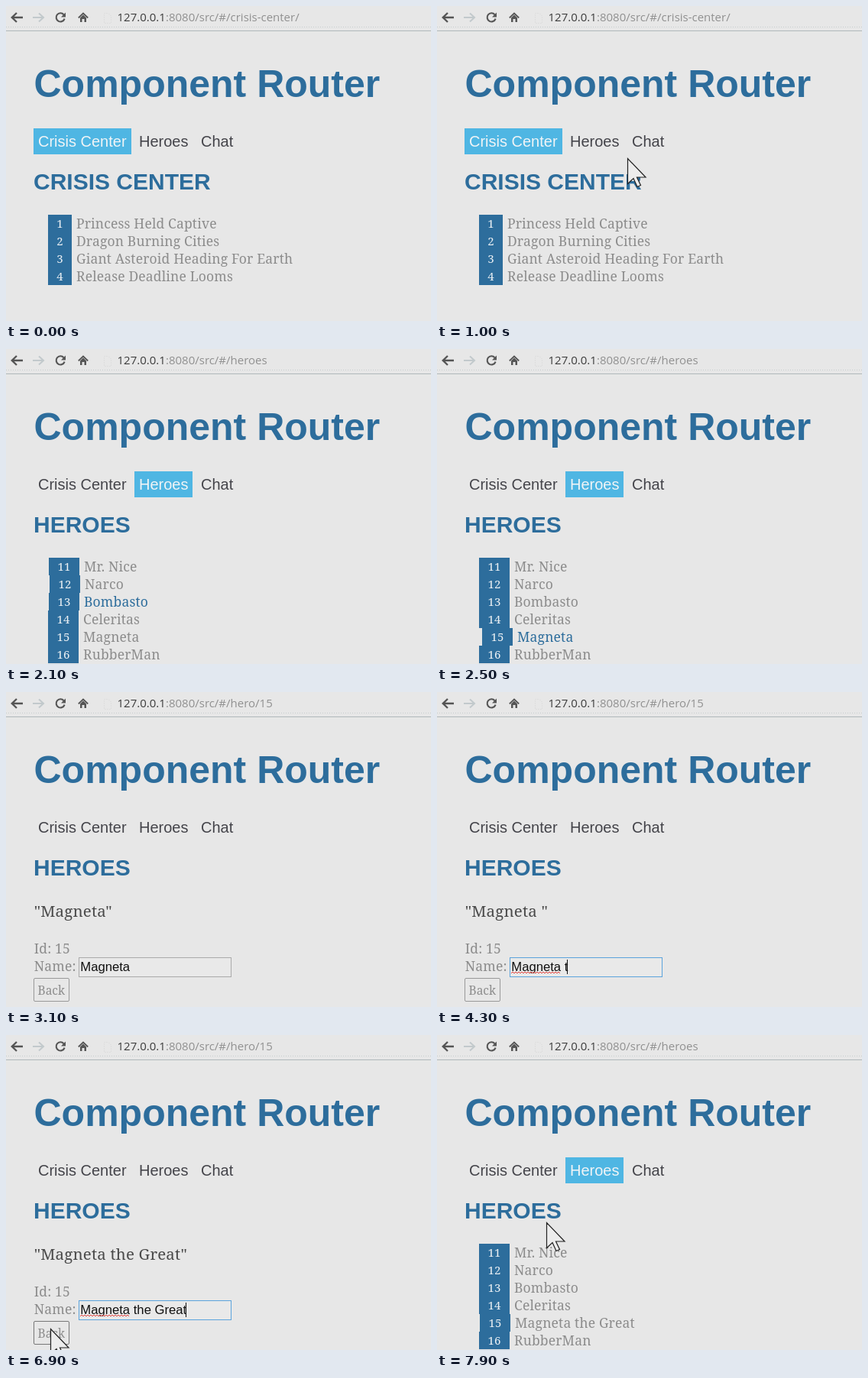
An HTML page that plays this animation: 556 px wide and 412 px high, repeating every 8000 ms.

```html
<!DOCTYPE html>
<html lang="en">
<head>
<meta charset="utf-8">
<title>Component Router</title>
<style>
  html, body { margin: 0; width: 100%; height: 100%; overflow: hidden; background: #e7e7e7; }
  svg { display: block; width: 556px; height: 412px; }
  text { white-space: pre; }
  .url { font: 15px "Open Sans", sans-serif; fill: #909090; }
  .host { fill: #3c3c3c; }
  .title, .head { font: bold 50px "Liberation Sans", Arial, sans-serif; fill: #2d6d9c; }
  .head { font-size: 30px; }
  .nav { font: 20px "Liberation Sans", Arial, sans-serif; fill: #44444a; }
  .nav.lit { fill: #f0f4f6; }
  .body { font: 17.5px "Noto Serif", serif; letter-spacing: .15px; fill: #8c8c8c; }
  .body.lit { fill: #2d6d9c; }
  .name { font-size: 20.5px; fill: #4a4a4a; }
  .num { font: 15px "Noto Serif", serif; fill: #eef2f5; text-anchor: middle; }
  .back { font-size: 15.5px; letter-spacing: 0; }
  .field { font: 16.67px "Liberation Sans", Arial, sans-serif; fill: #111; }
</style>
</head>
<body>
<svg viewBox="0 0 556 412" xmlns="http://www.w3.org/2000/svg">
  <rect width="556" height="412" fill="#e7e7e7"/>
  <path d="M0 27.5H556" stroke="#c6cccd" stroke-dasharray="1 2"/>
  <path d="M0 32.5H556" stroke="#b0b8ba"/>
  <g fill="none" stroke="#555" stroke-width="2.4">
    <path d="M14 9L7.8 15L14 21M8 15H22"/>
    <path d="M43 9.5L49 15L43 20.5M35 15H49" stroke="#c2c9cc" stroke-width="2"/>
    <path d="M75.5 11.2A5.6 5.6 0 1 0 76.6 16.6" stroke-width="2.1"/>
    <path d="M78 8.5V14.5H72Z" fill="#555" stroke="none"/>
    <path d="M94.8 15.5L101 9.6L107.2 15.5" stroke-width="1.8"/>
    <path d="M97 15.5L101 11.5L105 15.5V21H102.5V17H99.5V21H97Z" fill="#555" stroke="none"/>
    <path d="M128.5 9.5H134L137.5 13V22.5H128.5Z" stroke="#d4d4d4" stroke-width="1" stroke-dasharray="1 2"/>
  </g>
  <text class="title" x="36.5" y="119">Component Router</text>
  <g id="scene"></g>
</svg>
<script>
const LOOP = 8000, STEP = 100, BLUE = '#2d6d9c';
const NAME = 'Magneta the Great';
const crises = ['Princess Held Captive', 'Dragon Burning Cities',
  'Giant Asteroid Heading For Earth', 'Release Deadline Looms'];
const heroes = ['Mr. Nice', 'Narco', 'Bombasto', 'Celeritas', 'Magneta', 'RubberMan'];
const links = [
  { label: 'Crisis Center', x: 36, w: 128, textX: 42 },
  { label: 'Heroes', x: 168, w: 76, textX: 174 },
  { label: 'Chat', x: 249, w: 54, textX: 255 }
];

// Row index, pointer enters, pointer leaves
const hovers = [[0, 1850, 1950], [1, 1950, 2050], [2, 2050, 2150], [3, 2150, 2300],
  [4, 2300, 2700], [4, 7200, 7750]];

// Time, number of letters
const typed = [[0, 7], [4000, 8], [4300, 9], [4400, 10], [4500, 11], [4800, 12],
  [5000, 13], [5200, 14], [5400, 15], [5500, 16], [5600, 17]];
const shown = [[0, 7], [4000, 8], [4400, 9], [4500, 11], [4800, 12],
  [5000, 13], [5300, 14], [5400, 15], [5600, 16], [5700, 17]];

// The arrow is only drawn away from links, list rows and the text field
const moves = [
  { from: 600, to: 1100, path: [[437, 237], [412, 234], [355, 225], [295, 211], [249, 199]] },
  { from: 1700, to: 1900, path: [[203, 200], [180, 236]] },
  { from: 2700, to: 3000, path: [[128, 382], [130, 380], [133, 376]] },
  { from: 6400, to: 7100, path: [[150, 376], [112, 383], [82, 387], [65, 386], [58, 384]] },
  { from: 7900, to: 8000, path: [[143, 245]] }
];

const clamp = v => Math.max(0, Math.min(1, v));
const at = (steps, t) => steps.filter(s => s[0] <= t).pop()[1];
const between = (t, a, b) => t >= a && t < b;
const text = (cls, x, y, str) => `<text class="${cls}" x="${x}" y="${y}">${str}</text>`;
const rect = (x, y, w, h, fill, extra = '') =>
  `<rect x="${x}" y="${y}" width="${w}" height="${h}" fill="${fill}" ${extra}/>`;

const pen = document.createElement('canvas').getContext('2d');
function fieldWidth(str) {
  pen.font = '16.67px "Liberation Sans", Arial, sans-serif';
  return pen.measureText(str).width;
}

function header(path, active, hovered, title) {
  const nav = links.map((l, i) => {
    const fill = i === active ? '#4fb6e3' : i === hovered ? '#1171a3' : '';
    return (fill ? rect(l.x, 160, l.w, 34, fill) : '') +
      text(fill ? 'nav lit' : 'nav', l.textX, 184, l.label);
  }).join('');
  return text('url', 145.5, 20, `<tspan class="host">127.0.0.1</tspan>:8080/src/#/${path}`) +
    nav + text('head', 36, 240, title);
}

function list(items, first, badge, t) {
  return items.map((item, i) => {
    let shift = 0, lit = false;
    if (first > 1) for (const [row, a, b] of hovers) if (row === i) {
      shift += 4 * (clamp((t - a) / 200) - clamp((t - b) / 200));
      lit = lit || between(t, a, b);
    }
    const x = 55 + shift, y = 273 + 23 * i;
    return rect(x, y, badge, 23, BLUE) + text('num', x + badge / 2, y + 17, first + i) +
      text(lit ? 'body lit' : 'body', x + badge + 6, y + 17.7, item);
  }).join('');
}

function detail(t) {
  const value = NAME.slice(0, at(typed, t));
  const focus = t >= 3200;
  const caretOn = focus && !between(t, 3800, 4000) && !between(t, 6200, 6700);
  const caretX = Math.round(97.3 + fieldWidth(value)) - .5;
  let wave = 'M97 368';
  for (let x = 99, up = true; x <= 161; x += 2, up = !up) wave += `L${x} ${up ? 366 : 368}`;
  return text('body name', 36.7, 294, `"${NAME.slice(0, at(shown, t))}"`) +
    text('body', 36.8, 342, 'Id: 15') + text('body', 36.8, 365, 'Name:') +
    rect(95.5, 347.5, 199, 25, '#e9e9e9', `stroke="${focus ? '#5ba3dc' : '#aaa'}"`) +
    text('field', 97.3, 365, value) +
    (t >= 4000 ? `<path d="${wave}" fill="none" stroke="#e0403c"/>` : '') +
    (caretOn ? `<path d="M${caretX} 350V369" stroke="#111"/>` : '') +
    rect(36.5, 374.5, 46, 30, '#e7e7e7',
      `rx="1.5" stroke="${between(t, 6600, 7100) ? '#777' : '#999'}"`) +
    text('body back', 41.5, 395.5, 'Back');
}

function arrow(t) {
  const move = moves.find(m => between(t, m.from, m.to));
  if (!move) return '';
  const i = Math.min(move.path.length - 1, Math.floor((t - move.from) / STEP));
  return `<path transform="translate(${move.path[i]})" d="M.5 .5V33.5L8 26.5L13 37.5L17.5 35.5L12.5 25H24Z"
    fill="#ececec" stroke="#222" stroke-width="1.2"/>`;
}

function scene(t) {
  let view;
  if (t < 1500) {
    view = header('crisis-center/', 0, t >= 1100 ? 1 : -1, 'CRISIS CENTER') + list(crises, 1, 31, t);
  } else if (between(t, 2700, 7100)) {
    view = header('hero/15', -1, -1, 'HEROES') + detail(t);
  } else {
    const items = heroes.map((h, i) => i === 4 && t >= 7100 ? NAME : h);
    view = header('heroes', 1, -1, 'HEROES') + list(items, 11, 40, t);
  }
  return view + arrow(t);
}

const stage = document.getElementById('scene');
const start = performance.now();
let last = -1;
function tick() {
  const t = Math.floor((performance.now() - start) % LOOP / STEP) * STEP;
  if (t !== last) {
    stage.innerHTML = scene(t);
    last = t;
  }
  requestAnimationFrame(tick);
}
tick();
</script>
</body>
</html>
```
